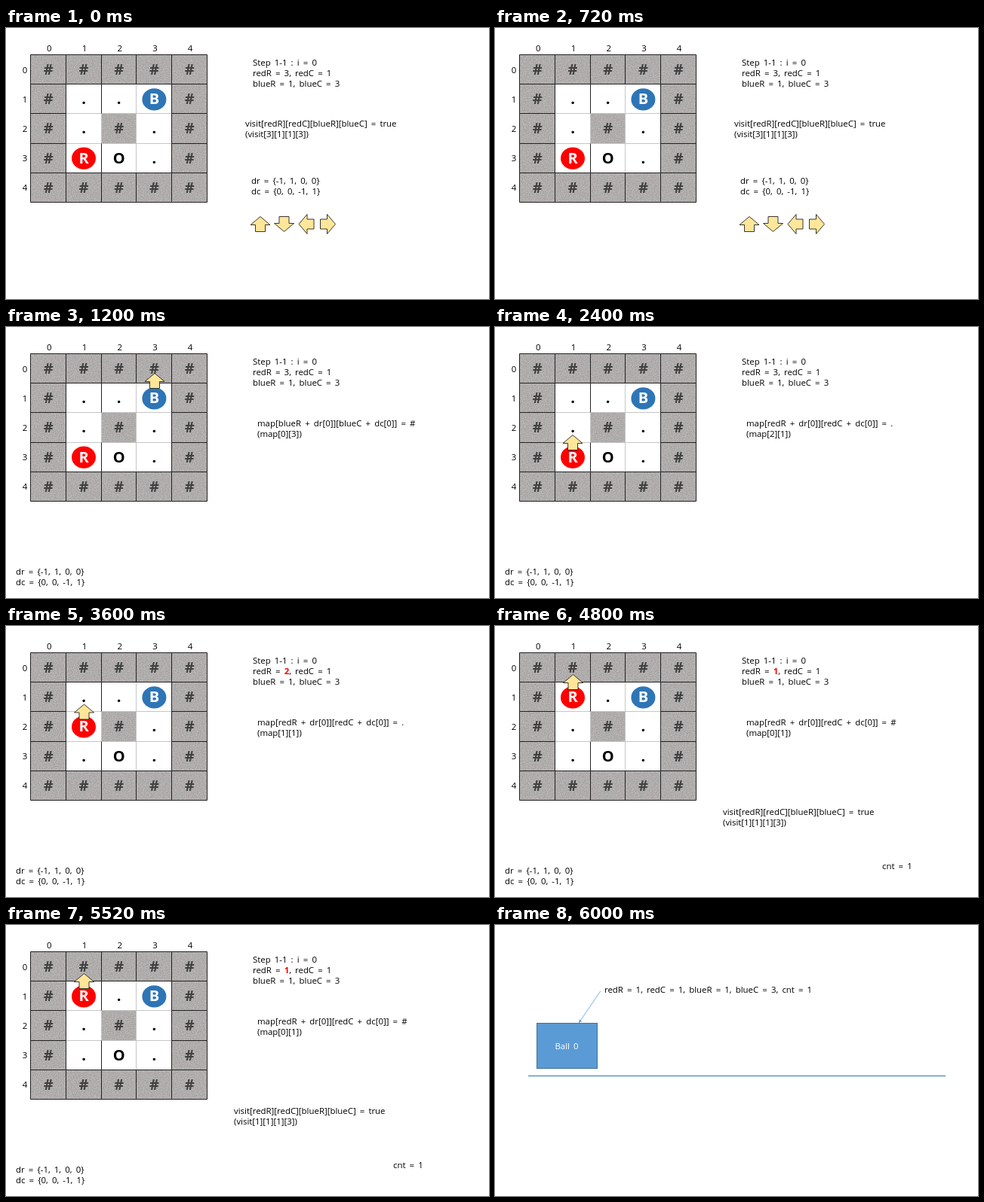
Write an HTML page that moves like this. It is 640 by 360 pixels and loops after 7.2 s.

```html
<!DOCTYPE html>
<html lang="en">
<head>
<meta charset="utf-8">
<title>Marble board steps</title>
<style>
  html, body { margin: 0; width: 100%; height: 100%; overflow: hidden; background: #fff; }
  svg { display: block; width: 100vw; height: 100vh; }
  text { font: 11.42px "Open Sans", "Noto Sans", sans-serif; word-spacing: 2.15px; white-space: pre; }
  .mid { text-anchor: middle; }
  .big { font-size: 20px; font-weight: 700; text-anchor: middle; }
  .hot { fill: #f00; font-weight: 700; }
</style>
</head>
<body>
<svg id="stage" viewBox="0 0 640 360">
  <defs>
    <filter id="grain" x="0" y="0" width="1" height="1" color-interpolation-filters="sRGB">
      <feTurbulence type="fractalNoise" baseFrequency=".75" numOctaves="2" seed="4"/>
      <feColorMatrix values=".22 0 0 0 .58  .22 0 0 0 .566  .22 0 0 0 .566  0 0 0 0 1"/>
      <feComposite in2="SourceGraphic" operator="in"/>
    </filter>
  </defs>
</svg>
<script>
const STEP = 1200, COUNT = 6;
const stage = document.getElementById('stage');
const layers = [];

// Adds a layer that is visible during the listed steps.
function layer(steps, ...parts) {
  const g = document.createElementNS('http://www.w3.org/2000/svg', 'g');
  g.innerHTML = parts.join('');
  stage.append(g);
  layers.push({ g, steps });
}

const text = (x, y, s, attrs = '') => `<text x="${x}" y="${y}" ${attrs}>${s}</text>`;
const lines = (x, y, ...rows) => rows.map((s, i) => text(x, y + i * 14, s)).join('');
const range = [0, 1, 2, 3, 4];
const edgeX = c => 32.5 + Math.round(c * 46.8);
const edgeY = r => 35.5 + Math.round(r * 39.2);
const midX = c => 56.3 + c * 46.7;
const midY = r => 55.2 + r * 39.1;

const isRim = (r, c) => r % 4 === 0 || c % 4 === 0;
const isWall = (r, c) => isRim(r, c) || (r === 2 && c === 2);
const cells = range.flatMap(r => range.map(c => [r, c]));
const box = ([r, c]) =>
  `M${edgeX(c)} ${edgeY(r)}H${edgeX(c + 1)}V${edgeY(r + 1)}H${edgeX(c)}Z`;
const path = (list, attrs) => `<path d="${list.map(box).join('')}" ${attrs}/>`;
const glyph = (r, c, s, fill) => text(midX(c), midY(r) + 7, s, `class="big" fill="${fill}"`);

const ball = (r, c, s, fill) =>
  `<ellipse cx="${midX(c)}" cy="${midY(r) + .6}" rx="16" ry="14.6" fill="${fill}"/>` +
  glyph(r, c, s, '#fff');

// Block arrow centred on x, y; the tip points up at angle 0.
const arrow = (x, y, angle = 0) =>
  `<path d="M0-10L13 1H6.5V10H-6.5V1H-13Z" transform="translate(${x} ${y}) rotate(${angle})"
    fill="#ffe699" stroke="#222" stroke-width=".9"/>`;

function board() {
  const walls = cells.filter(([r, c]) => isWall(r, c));
  const rim = cells.filter(([r, c]) => isRim(r, c));
  const inner = cells.filter(([r, c]) => !isRim(r, c));
  // The divider after column 1 is dark beside the open rows.
  const divider = [1, 3].map(r => `M${edgeX(2)} ${edgeY(r)}V${edgeY(r + 1)}`).join('');
  return path(walls, 'fill="#afabab" filter="url(#grain)"') +
    path(inner, 'fill="none" stroke="#c4c4c4" stroke-width=".8"') +
    path(rim, 'fill="none" stroke="#222"') +
    `<path d="${divider}" stroke="#222"/>` +
    walls.map(([r, c]) => glyph(r, c, '#', '#404040')).join('') +
    range.map(i => text(midX(i) + 1, 31, i, 'class="mid"') +
      text(25, midY(i) + 4.8, i, 'class="mid"')).join('');
}

function pieces(redRow) {
  const open = cells.filter(([r, c]) => !isWall(r, c) &&
    !(r === 1 && c === 3) && !(r === redRow && c === 1));
  return open.map(([r, c]) => glyph(r, c, r === 3 && c === 2 ? 'O' : '.', '#000')).join('') +
    ball(1, 3, 'B', '#2e75b6') + ball(redRow, 1, 'R', '#f00');
}

const hot = n => `<tspan class="hot">${n}</tspan>`;
const status = red => lines(327, 50, 'Step 1-1 : i = 0', `redR = ${red}, redC = 1`, 'blueR = 1, blueC = 3');
const offsets = (x, y) => lines(x, y, 'dr = {-1, 1, 0, 0}', 'dc = {0, 0, -1, 1}');
const look = (name, found, at) =>
  lines(333, 132, `map[${name}R + dr[0]][${name}C + dc[0]] = ${found}`, `(map${at})`);
const visit = (x, y, at) =>
  lines(x, y, 'visit[redR][redC][blueR][blueC] = true', `(visit${at})`);

layer([0, 1, 2, 3, 4], board());
layer([0, 1, 2], pieces(3), status(3));
layer([3], pieces(2), status(hot(2)));
layer([4], pieces(1), status(hot(1)));
layer([1, 2, 3, 4], offsets(13, 329));

layer([0], visit(317, 131, '[3][1][1][3]'), offsets(325, 207),
  arrow(337, 260.5), arrow(368.5, 260.5, 180), arrow(398, 260.5, -90), arrow(426.5, 260.5, 90));
layer([1], arrow(197, 71.5), look('blue', '#', '[0][3]'));
layer([2], arrow(103, 153.5), look('red', '.', '[2][1]'));
layer([3], arrow(103.5, 114), look('red', '.', '[1][1]'));
layer([4], arrow(103.5, 74.5), look('red', '#', '[0][1]'),
  visit(302, 251, '[1][1][1][3]'), text(513, 323, 'cnt = 1'));

layer([5],
  '<path d="M44 200.5H597" stroke="#2e75a6"/>',
  '<rect x="55.5" y="130.5" width="80" height="60" fill="#5b9bd5" stroke="#41719c"/>',
  text(95, 165, 'Ball 0', 'class="mid" fill="#fff"'),
  '<path d="M140 87.5L112.5 128" stroke="#5b9bd5" stroke-width=".8"/>',
  '<path d="M111 130.3L111.8 125.6L115 127.8Z" fill="#5b9bd5"/>',
  text(145, 90, 'redR = 1, redC = 1, blueR = 1, blueC = 3, cnt = 1'));

const start = performance.now();
let shown = -1;
function draw() {
  const step = Math.floor((performance.now() - start) / STEP) % COUNT;
  if (step !== shown) {
    for (const { g, steps } of layers) g.style.display = steps.includes(step) ? '' : 'none';
    shown = step;
  }
  requestAnimationFrame(draw);
}
draw();
</script>
</body>
</html>
```
